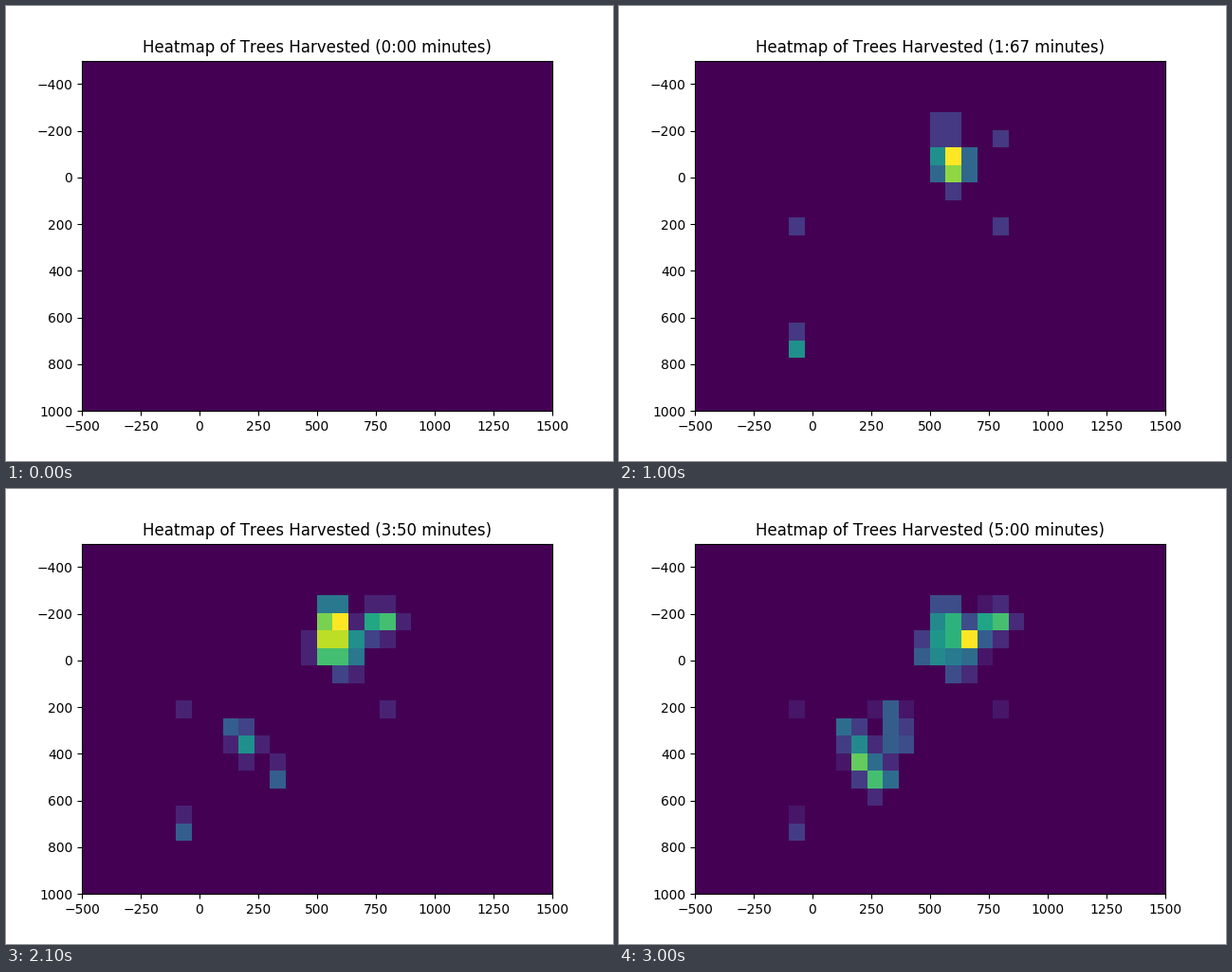
A matplotlib script for the animation above (3.1 s loop, 640 by 480 pixels).

```python
import numpy as np
import matplotlib.pyplot as plt
from matplotlib.animation import FuncAnimation

STEPS = 31
STEP_MS = 100
STEPS_PER_MINUTE = 6
ROWS, COLS = 20, 30
SPREAD = 0.55

# Harvest spots: column, row, peak tree count, first and last step of work.
SPOTS = [
    # scattered trees
    (6, 9, 1, 0, 5),
    (19, 9, 1, 0, 6),
    (6, 15.8, 3.3, 0, 7),
    # upper grove
    (15.7, 5.45, 9.8, 0, 7),
    (16.4, 7, 5, 4, 30),
    (15.4, 3.4, 5.8, 7, 13),
    (17, 5.4, 6.5, 7, 13),
    (19, 4, 11, 8, 30),
    (18, 4, 8, 13, 26),
    (15.6, 4, 11, 13, 21),
    (15, 5.5, 7.5, 17, 21),
    (14, 5.7, 5.5, 21, 26),
    (17, 5, 12, 21, 30),
    # lower grove
    (9.2, 10.2, 6.9, 17, 25),
    (10.1, 11, 5.4, 17, 21),
    (12, 12.8, 4, 17, 21),
    (10.2, 12, 12.5, 21, 30),
    (12.4, 10.6, 10, 21, 30),
    (11.1, 13, 11, 26, 30),
    (12, 9.1, 5.6, 26, 30),
]

row, col = np.mgrid[:ROWS, :COLS]


def trees_at(step):
    """Every spot grows steadily and spills a little into its neighbours."""
    total = np.zeros((ROWS, COLS))
    for x, y, peak, start, end in SPOTS:
        done = np.clip((step - start) / (end - start), 0, 1)
        dist2 = (col - x) ** 2 + (row - y) ** 2
        total += peak * done * np.exp(-dist2 / (2 * SPREAD ** 2))
    return np.floor(total)


def title_at(step):
    clock = f"{step / STEPS_PER_MINUTE:.2f}".replace(".", ":")
    return f"Heatmap of Trees Harvested ({clock} minutes)"


plt.rcParams["font.family"] = "DejaVu Sans"
plt.rcParams["text.kerning_factor"] = 6
fig, ax = plt.subplots(figsize=(6.4, 4.8), dpi=100)
image = ax.imshow(trees_at(0), cmap="viridis", vmin=0, vmax=1, aspect="auto",
                  interpolation="nearest", extent=(-500, 1500, 1000, -500))
title = ax.set_title(title_at(0))


def update(step):
    trees = trees_at(step)
    image.set_data(trees)
    image.set_clim(0, max(1, trees.max()))
    title.set_text(title_at(step))
    return image, title


anim = FuncAnimation(fig, update, frames=STEPS, interval=STEP_MS,
                     repeat=True, repeat_delay=0, blit=False)
plt.show()
```
